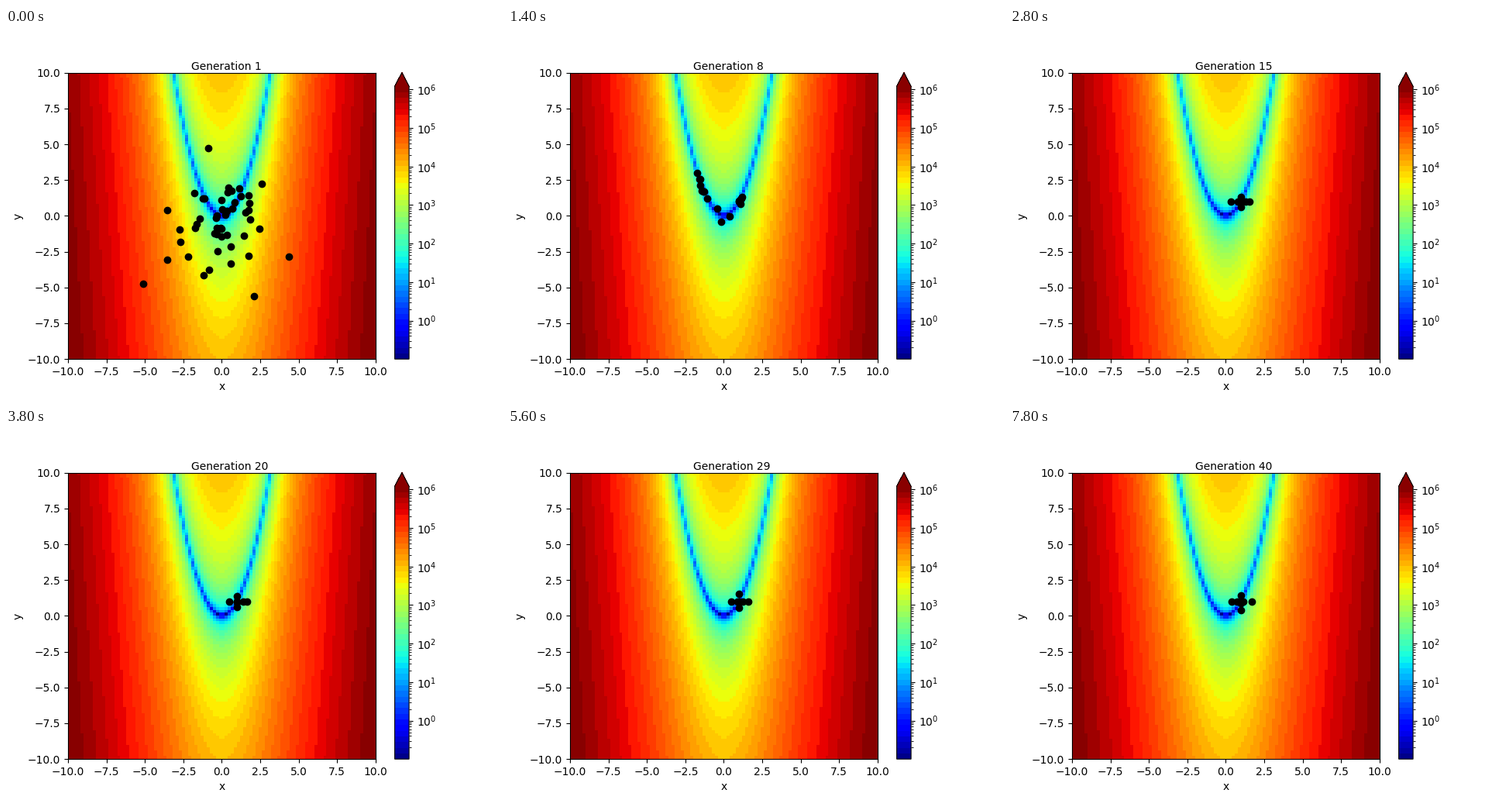
Animation, 640 px wide and 480 px high, one loop 8 s. Source, as a matplotlib script:

```python
import matplotlib.pyplot as plt
import numpy as np
from matplotlib.animation import FuncAnimation
from matplotlib.colors import ListedColormap, LogNorm

GENERATIONS = 40
INTERVAL = 200
VALLEY_GEN = 8      # population lies along the valley
CLUSTER_GEN = 15    # population has converged on (1, 1)
SHADES = 48


def landscape(x, y):
    return x ** 2 + 100 * (y - x ** 2) ** 2


def fittest(points, count):
    order = np.argsort(landscape(*points.T))
    return points[order[:count]]


def cross(points, count, rng):
    xs = rng.choice(points[:, 0], count)
    ys = rng.choice(points[:, 1], count)
    return np.column_stack([xs, ys])


def first_population(rng, count=49):
    points = rng.normal((-0.1, -0.2), (2.1, 2.4), (count, 2))
    return np.clip(points, (-5.1, -5.7), (5.1, 5.3))


def valley_population(rng):
    left = rng.normal(-1.25, 0.2, 8)
    right = rng.normal(1.0, 0.12, 5)
    floor = rng.uniform(-0.7, 0.6, 3)
    x = np.concatenate([left, right, floor])
    return np.column_stack([x, x ** 2 + rng.normal(0, 0.2, len(x))])


def cluster(rng):
    """The optimum with mutants that differ from it in x or in y only."""
    points = np.ones((8, 2))
    points[1:5, 0] = np.linspace(0.5, 1.6, 4) + rng.normal(0, 0.1, 4)
    points[5:, 1] = np.linspace(0.55, 1.5, 3) + rng.normal(0, 0.12, 3)
    return points


START = first_population(np.random.default_rng(1))
VALLEY = valley_population(np.random.default_rng(VALLEY_GEN))


def population(gen):
    rng = np.random.default_rng(gen)
    if gen == 1:
        return START
    if gen < VALLEY_GEN:
        t = (gen - 1) / (VALLEY_GEN - 1)
        pool = fittest(START, int(46 * (1 - t) ** 1.3) + 4)
        keep = pool[:max(3, len(pool) * 2 // 3)]
        arrived = VALLEY[rng.random(len(VALLEY)) < t]
        return np.vstack([keep, cross(pool, len(pool) // 3, rng), arrived])
    if gen < CLUSTER_GEN:
        t = (gen - VALLEY_GEN) / (CLUSTER_GEN - VALLEY_GEN)
        keep = fittest(VALLEY, round(len(VALLEY) * (1 - t)))
        return np.vstack([keep, cluster(rng)[:1 + int(7 * t)]])
    return cluster(rng)


fig, ax = plt.subplots(figsize=(6.4, 4.8), dpi=100)
axis = np.linspace(-10, 10, 100)
cost = landscape(*np.meshgrid(axis, axis))
jet = plt.get_cmap("jet")
shades = ListedColormap(jet((np.arange(SHADES) + 0.5) / SHADES))
image = ax.imshow(cost, extent=(-10, 10, -10, 10), origin="lower",
                  aspect="auto", interpolation="nearest", cmap=shades,
                  norm=LogNorm(cost.min(), cost.max()))
fig.colorbar(image, ax=ax, extend="max")
ax.set(xlabel="x", ylabel="y")
dots, = ax.plot([], [], "ko")
ax.set(xlim=(-10, 10), ylim=(-10, 10))
label = ax.text(0.4, 1.01, "", transform=ax.transAxes)


def update(i):
    dots.set_data(*population(i + 1).T)
    label.set_text(f"Generation {i + 1}")
    return dots, label


anim = FuncAnimation(fig, update, frames=GENERATIONS, interval=INTERVAL,
                     repeat=True, repeat_delay=0)
plt.show()
```
